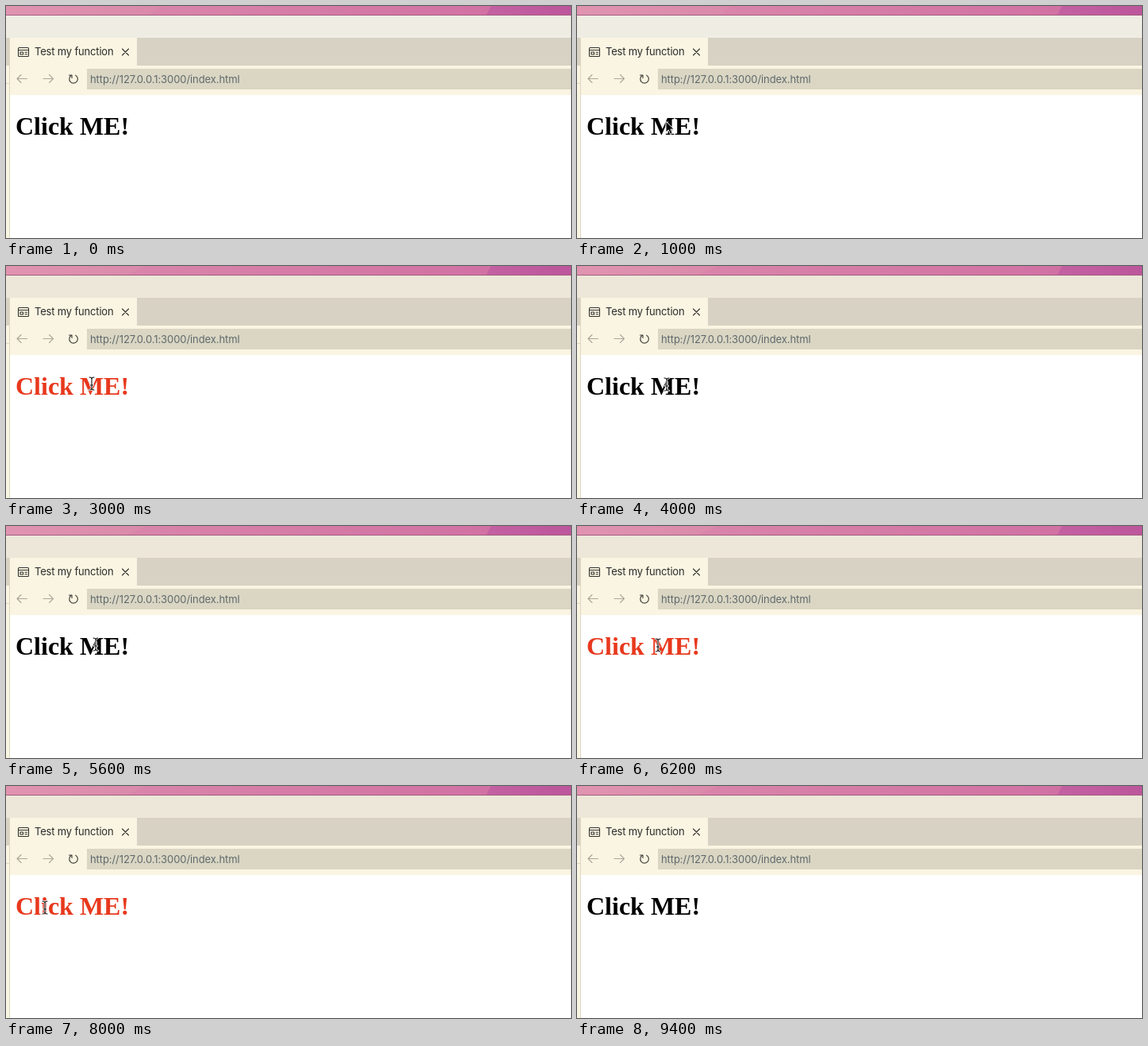
Recreate the animation shown at these times as an HTML page. Size 712 px wide and 292 px high, loop 9600 ms.

```html
<!DOCTYPE html>
<html lang="en">
<head>
<meta charset="utf-8">
<title>Test my function</title>
<style>
  html, body { margin: 0; width: 100%; height: 100%; overflow: hidden; background: #fefffe; }
  svg { display: block; width: 712px; height: 292px; }
  .ui { font: 13px Inter, "Open Sans", sans-serif; white-space: pre; }
  .line { fill: none; stroke-linecap: round; stroke-linejoin: round; }
  #heading { font: bold 32px "Liberation Serif", Times, serif; }
</style>
</head>
<body>
<svg viewBox="0 0 712 292" xmlns="http://www.w3.org/2000/svg">
  <defs>
    <linearGradient id="sky">
      <stop offset="0" stop-color="#e094b0"/>
      <stop offset="1" stop-color="#d989aa"/>
    </linearGradient>
    <linearGradient id="hill">
      <stop offset="0" stop-color="#d985aa"/>
      <stop offset="1" stop-color="#cf6da2"/>
    </linearGradient>
    <linearGradient id="peak">
      <stop offset="0" stop-color="#c361a2"/>
      <stop offset="1" stop-color="#bd569c"/>
    </linearGradient>
  </defs>

  <!-- desktop -->
  <rect width="200" height="12" fill="url(#sky)"/>
  <path id="slope" fill="url(#hill)"/>
  <path d="M611 0H712V12H605Z" fill="url(#peak)"/>
  <rect y="11" width="712" height="1" fill="#a65d83"/>

  <!-- window -->
  <rect id="title" y="12" width="712" height="28"/>
  <rect y="40" width="712" height="35" fill="#d8d2c4"/>
  <rect y="75" width="712" height="37" fill="#faf5e2"/>
  <rect y="112" width="5" height="180" fill="#f9f5e3"/>
  <rect x="5" y="112" width="707" height="180" fill="#fefffe"/>
  <rect x="5" y="40" width="160" height="35" fill="#faf5e2"/>
  <path d="M4.5 40V292M0 97.5H4" stroke="#ddd7c0" fill="none"/>
  <rect x="102" y="79" width="610" height="26" fill="#dad6c3"/>

  <!-- tab -->
  <g class="line" stroke="#33332f" stroke-width="1.1">
    <rect x="15.5" y="52.5" width="13" height="11" rx="1"/>
    <path d="M15.5 55.5H28.5M18 58H21.5V61H18ZM24 58.2H26.5M24 60.8H26.5"/>
    <path d="M146.5 54L154.5 62M154.5 54L146.5 62"/>
  </g>
  <text class="ui" x="36" y="62" fill="#2b2b29" letter-spacing="-.18">Test my function</text>

  <!-- navigation -->
  <g class="line" stroke="#aaa79b" stroke-width="1.1">
    <path d="M26.5 91.5H14M19 86.5L14 91.5L19 96.5"/>
    <path d="M47 91.5H59.5M54.5 86.5L59.5 91.5L54.5 96.5"/>
  </g>
  <path class="line" d="M82.3 87.3A5.3 5.3 0 1 0 87.7 87.2M79.5 87H83V90.5" stroke="#44433e" stroke-width="1.2"/>
  <text class="ui" x="106" y="97" fill="#5f696c" letter-spacing="-.08">http://127.0.0.1:3000/index.html</text>

  <text id="heading" x="12" y="162">Click ME!</text>

  <path id="arrow" d="M0 0V14L3.3 11L5.6 16.4L8.2 15.3L5.9 10.1H10.3Z"
        fill="#000" stroke="#fff" stroke-width="1" stroke-linejoin="round"/>
  <g id="beam" class="line">
    <path id="bar" d="M-3 -8Q0 -8 0 -5.5Q0 -8 3 -8M0 -5.5V5.5M-3 8Q0 8 0 5.5Q0 8 3 8M-1.7 2H1.7"
          stroke="#fff" stroke-width="2.6"/>
    <use href="#bar" style="display:none"/>
    <path d="M-3 -8Q0 -8 0 -5.5Q0 -8 3 -8M0 -5.5V5.5M-3 8Q0 8 0 5.5Q0 8 3 8M-1.7 2H1.7"
          stroke="#111" stroke-width="1.1"/>
  </g>
</svg>
<script>
const LOOP = 9600, STEP = 200;
const el = id => document.getElementById(id);
const heading = el('heading'), arrow = el('arrow'), beam = el('beam');
const title = el('title'), slope = el('slope');
el('beam').querySelector('use').remove();

// pointer path: time, x, y
const path = [
  [200, 243, 179], [400, 190, 166], [600, 146, 155], [1000, 112, 145],
  [1400, 107, 142], [2000, 107, 142], [2200, 108, 148], [3000, 108, 148],
  [4000, 113, 149], [5600, 113, 149], [6200, 102, 150], [6800, 96, 151],
  [7600, 52, 153], [8000, 49, 153], [8400, 62, 155], [8800, 125, 203],
  [9000, 225, 228], [9200, 405, 267]
];
// each click flips the colour
const clicks = [2200, 3600, 6000, 6800, 7400, 8400];

function pointer(t) {
  const i = path.findIndex(p => p[0] >= t);
  if (i <= 0) return path[0].slice(1);
  const [t0, x0, y0] = path[i - 1], [t1, x1, y1] = path[i];
  const k = (t - t0) / (t1 - t0);
  return [x0 + (x1 - x0) * k, y0 + (y1 - y0) * k];
}

function draw(ms) {
  const t = Math.floor(ms % LOOP / STEP) * STEP;
  const late = t >= 1400;
  title.setAttribute('fill', late ? '#ece7d8' : '#efede3');
  slope.setAttribute('d', late ? 'M176 0H712V11H152Z' : 'M194 0H712V11H180Z');

  const red = clicks.filter(c => c <= t).length % 2;
  heading.setAttribute('fill', red ? '#e8381d' : '#000');

  const shown = t >= 200 && t < 9400;
  const text = t >= 2200 && t < 8800;
  arrow.style.display = shown && !text ? '' : 'none';
  beam.style.display = shown && text ? '' : 'none';
  if (shown) {
    const [x, y] = pointer(t);
    (text ? beam : arrow).setAttribute('transform', `translate(${x} ${y})`);
  }
}

const start = performance.now();
function tick() {
  draw(performance.now() - start);
  requestAnimationFrame(tick);
}
tick();
</script>
</body>
</html>
```
